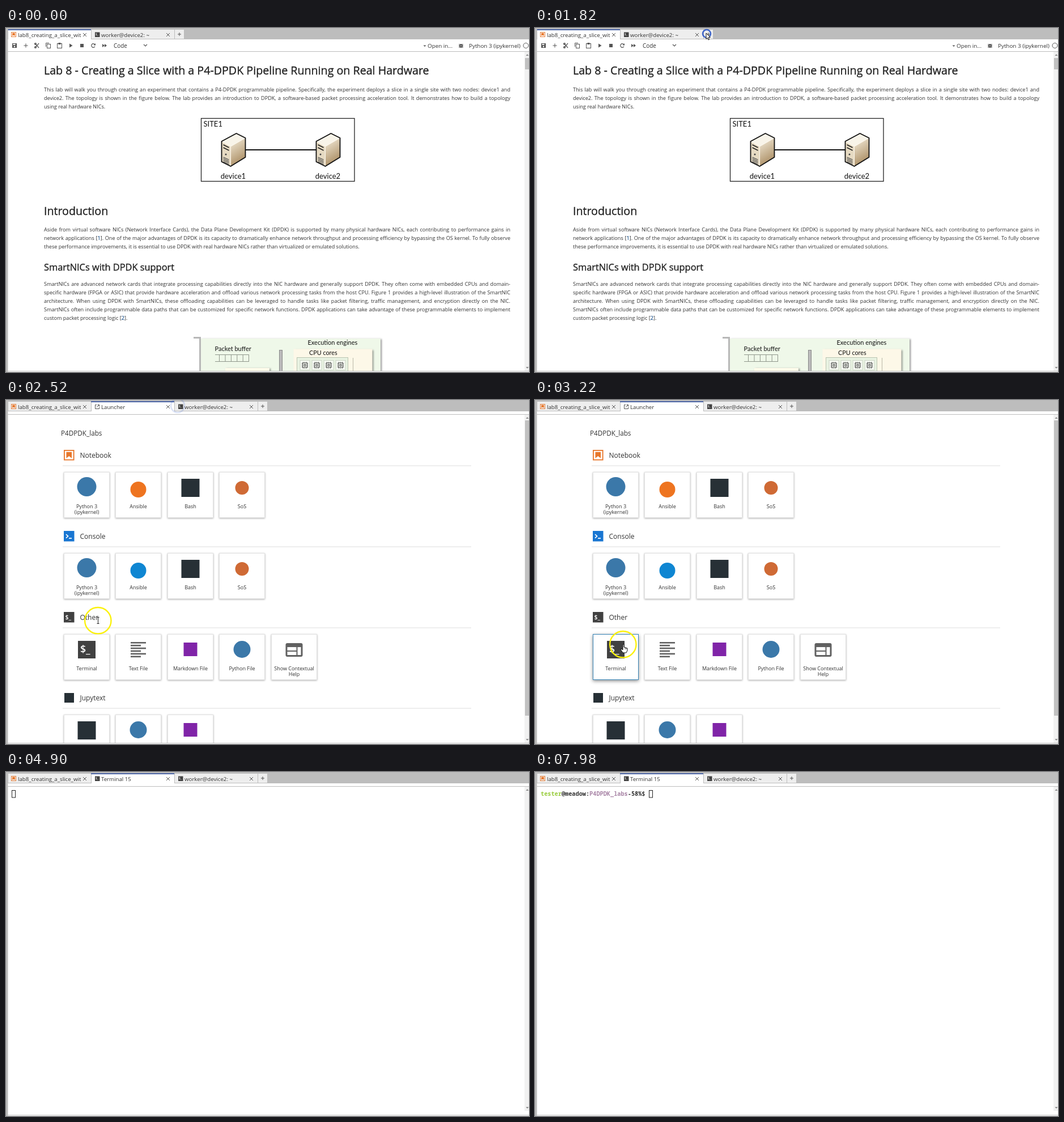
Animation of 923 by 607 pixels, one loop 8.09 s. Source, as an HTML page with a canvas:

```html
<!DOCTYPE html>
<html lang="en">
<head>
<meta charset="utf-8">
<title>Notebook walkthrough</title>
<style>
html, body { margin: 0; width: 100%; height: 100%; overflow: hidden; background: #fff; }
canvas { display: block; }
</style>
</head>
<body>
<canvas id="stage" width="923" height="607"></canvas>
<script>
const g = document.getElementById('stage').getContext('2d');
const LOOP = 8090, STEP = 140;
const SANS = '"Open Sans", "Noto Sans", sans-serif';
const FIG = 'Lato, sans-serif';
const MONO = '"Noto Sans Mono", monospace';
const INK = '#333', ICON = '#555', LINE = '#bdbdbd';
const HOST = 'worker@device2: ~';

// Spans in which the picture moves; it rests in between.
const MOVES = [[0, 0], [840, 1260], [1540, 1960], [2240, 3220], [3360, 3920], [4340, 4340]];
const PATH = [[840, 332, 120], [980, 318, 72], [1120, 309, 35], [1260, 302, 9], [2240, 302, 9],
  [2380, 215, 230], [2520, 162, 389], [2660, 160, 407], [3220, 155, 431]];
const CLICKS = [{ at: 1680, life: 1000 }, { at: 3360, life: 560 }];

const INTRO = [
  'This lab will walk you through creating an experiment that contains a P4-DPDK programmable pipeline. Specifically, the experiment deploys a slice in a single site with two nodes: device1 and',
  'device2. The topology is shown in the figure below. The lab provides an introduction to DPDK, a software-based packet processing acceleration tool. It demonstrates how to build a topology',
  'using real hardware NICs.'];
const ABOUT = [
  'Aside from virtual software NICs (Network Interface Cards), the Data Plane Development Kit (DPDK) is supported by many physical hardware NICs, each contributing to performance gains in',
  'network applications [1]. One of the major advantages of DPDK is its capacity to dramatically enhance network throughput and processing efficiency by bypassing the OS kernel. To fully observe',
  'these performance improvements, it is essential to use DPDK with real hardware NICs rather than virtualized or emulated solutions.'];
const SMART = [
  'SmartNICs are advanced network cards that integrate processing capabilities directly into the NIC hardware and generally support DPDK. They often come with embedded CPUs and domain-',
  'specific hardware (FPGA or ASIC) that provide hardware acceleration and offload various network processing tasks from the host CPU. Figure 1 provides a high-level illustration of the SmartNIC',
  'architecture. When using DPDK with SmartNICs, these offloading capabilities can be leveraged to handle tasks like packet filtering, traffic management, and encryption directly on the NIC.',
  'SmartNICs often include programmable data paths that can be customized for specific network functions. DPDK applications can take advantage of these programmable elements to implement',
  'custom packet processing logic [2].'];

function rect(x, y, w, h, color) {
  g.fillStyle = color;
  g.fillRect(x, y, w, h);
}

function frame(x, y, w, h, color, width = 1) {
  g.strokeStyle = color;
  g.lineWidth = width;
  g.strokeRect(x, y, w, h);
}

function disc(x, y, r, color) {
  g.fillStyle = color;
  g.beginPath();
  g.arc(x, y, r, 0, 7);
  g.fill();
}

function ring(x, y, r, color, width) {
  g.strokeStyle = color;
  g.lineWidth = width;
  g.beginPath();
  g.arc(x, y, r, 0, 7);
  g.stroke();
}

function trace(points) {
  g.beginPath();
  for (let i = 0; i < points.length; i += 2) g.lineTo(points[i], points[i + 1]);
}

function line(color, width, ...points) {
  trace(points);
  g.strokeStyle = color;
  g.lineWidth = width;
  g.stroke();
}

function poly(color, ...points) {
  trace(points);
  g.fillStyle = color;
  g.fill();
}

function text(str, x, y, size, { color = INK, font = SANS, weight = 400, align = 'left' } = {}) {
  g.font = `${weight} ${size}px ${font}`;
  g.textAlign = align;
  g.fillStyle = color;
  g.fillText(str, x, y);
}

// A fine outline gives the regular face a medium weight.
function heading(str, y, size) {
  text(str, 67, y, size, { color: '#222' });
  g.strokeStyle = '#222';
  g.lineWidth = 0.35;
  g.strokeText(str, 67, y);
}

function paragraph(lines, top) {
  const left = 67, right = 890;
  lines.forEach((str, i) => {
    const words = str.split(' ');
    g.font = `400 9.1px ${SANS}`;
    const widths = words.map(w => g.measureText(w).width);
    const total = widths.reduce((a, b) => a + b, 0);
    const last = i === lines.length - 1;
    const gap = last ? g.measureText(' ').width : (right - left - total) / (words.length - 1);
    let x = left;
    words.forEach((w, k) => {
      text(w, x, top + i * 15.2, 9.1);
      if (w[0] === '[') text(w[1], x + g.measureText('[').width, top + i * 15.2, 9.1, { color: '#3578c0' });
      x += widths[k] + gap;
    });
  });
}

function cross(x, y) {
  line(ICON, 1, x - 3, y - 3, x + 3, y + 3);
  line(ICON, 1, x + 3, y - 3, x - 3, y + 3);
}

function plus(x, y, r) {
  line(ICON, 1, x - r, y, x + r, y);
  line(ICON, 1, x, y - r, x, y + r);
}

function promptIcon(x, y, size) {
  rect(x, y, size, size, '#414141');
  text('$_', x + size * 0.13, y + size * 0.69, size * 0.57, { color: '#fff', weight: 600 });
}

function bookmark(x, y, s) {
  frame(x + s * 0.05, y + s * 0.05, s * 0.9, s * 0.9, '#e8772b', s * 0.1);
  poly('#e8772b', x + s * .24, y + s * .2, x + s * .76, y + s * .2, x + s * .76, y + s * .8,
    x + s * .5, y + s * .6, x + s * .24, y + s * .8);
}

function tab(i, title, kind, active) {
  const x = 3 + i * 147;
  rect(x, 3, 147, 17, active ? '#fff' : '#eee');
  frame(x + 0.5, 2.5, 147, 17, LINE);
  if (active) {
    rect(x + 1, 19, 146, 2, '#fff');
    rect(x, 2, 147, 2, '#4a63a4');
  }
  if (kind === 'book') bookmark(x + 6, 7, 9);
  if (kind === 'shell') promptIcon(x + 7, 7.5, 8.5);
  if (kind === 'launch') {
    line(ICON, 1, x + 10, 8.5, x + 7.5, 8.5, x + 7.5, 15.5, x + 14.5, 15.5, x + 14.5, 12.5);
    line(ICON, 1, x + 10, 13, x + 14.5, 8.5, x + 11.5, 8.5);
    line(ICON, 1, x + 14.5, 8.5, x + 14.5, 11.5);
  }
  g.save();
  g.beginPath();
  g.rect(x, 0, 130, 20);
  g.clip();
  text(title, x + 18, 15.5, 9.7);
  g.restore();
  cross(x + 136, 12);
}

function chrome(tabs, active) {
  rect(0, 0, 923, 607, '#fff');
  rect(0, 0, 923, 20, LINE);
  tabs.forEach(([title, kind], i) => tab(i, title, kind, i === active));
  const end = 4 + tabs.length * 147;
  rect(end, 3, 16, 16, '#eee');
  plus(end + 8, 11, 3);
  rect(0, 0, 3.5, 607, LINE);
  rect(3, 605, 920, 1, LINE);
}

function scrollbar(top, bottom, thumbTop, thumbHeight) {
  rect(915, top, 8, bottom - top, '#f1f1f1');
  if (thumbHeight) rect(916, thumbTop, 7, thumbHeight, '#c1c1c1');
  poly('#8a8a8a', 917.5, top + 7, 920, top + 4, 922.5, top + 7);
  poly('#8a8a8a', 917.5, bottom - 7, 920, bottom - 4, 922.5, bottom - 7);
}

function toolbar() {
  const y = 31;
  rect(11, y - 4, 8, 8, ICON);
  rect(12.5, y - 3, 4, 2, '#fff');
  disc(15, y + 1.8, 1.3, '#fff');
  plus(35, y, 3.6);
  line(ICON, 1.2, 51, y - 4, 58, y + 4);
  line(ICON, 1.2, 51, y + 4, 58, y - 4);
  ring(52, y - 3, 1.5, ICON, 1.2);
  ring(52, y + 3, 1.5, ICON, 1.2);
  line(ICON, 1, 70.5, y + 2, 70.5, y - 4.5, 76, y - 4.5);
  frame(72.5, y - 2.5, 6, 7, ICON);
  frame(90.5, y - 3.5, 8, 8, ICON);
  rect(92.5, y - 5, 4, 3, ICON);
  poly(ICON, 112, y - 3.5, 117.5, y, 112, y + 3.5);
  rect(131, y - 3, 6, 6, ICON);
  g.strokeStyle = ICON;
  g.lineWidth = 1.2;
  g.beginPath();
  g.arc(154, y, 3.3, 0.5, 5.6);
  g.stroke();
  poly(ICON, 158, y - 4, 158, y - 0.5, 154.5, y - 0.5);
  poly(ICON, 170, y - 3, 174, y, 170, y + 3);
  poly(ICON, 174, y - 3, 178, y, 174, y + 3);
  text('Code', 190, 34.6, 9.9);
  line(ICON, 1.2, 243, 29, 246, 32, 249, 29);
  poly(ICON, 736.5, 30.5, 741.5, 30.5, 739, 33);
  text('Open in...', 744, 34.6, 9.8);
  disc(803, 31.5, 3, ICON);
  for (const dy of [-2.5, 0, 2.5]) line(ICON, 1, 799, 31.5 + dy, 807, 31.5 + dy);
  line('#fff', 0.8, 801.8, 31.5, 804.2, 31.5);
  text('Python 3 (ipykernel)', 817, 34.6, 9.85);
  ring(917.5, 31, 4.5, ICON, 1);
  rect(3, 41, 920, 1, LINE);
}

function machine(x, label) {
  g.save();
  g.translate(x, 185);
  const side = g.createLinearGradient(18, 10, 44, 50);
  side.addColorStop(0, '#f3ebd9');
  side.addColorStop(1, '#a88a5f');
  poly('#e6dac2', 1, 15, 17, 24, 17, 59, 1, 51);
  poly('#f8f4e9', 1, 15, 27, 1, 43, 9, 17, 24);
  poly(side, 17, 24, 43, 9, 43, 43, 17, 59);
  line('#fffaf0', 1, 1, 15, 17, 24, 43, 9);
  line('#fffaf0', 1, 17, 24, 17, 58);
  for (const y of [21, 26]) line('#222', 1.6, 4, y, 14, y + 5);
  disc(8.5, 38, 1.5, '#444');
  for (let y = 43; y < 51; y += 2.6) line('#444', 1.1, 4, y, 14, y + 4.6);
  g.lineJoin = 'round';
  trace([1, 15, 27, 1, 43, 9, 43, 43, 17, 59, 1, 51]);
  g.closePath();
  g.strokeStyle = '#111';
  g.lineWidth = 1.8;
  g.stroke();
  g.restore();
  text(label, x + 21.5, 266, 13, { font: FIG, color: '#111', align: 'center' });
}

function topology() {
  frame(344.5, 159.5, 270.5, 111, '#222', 1.3);
  text('SITE1', 348.5, 174, 13, { font: FIG, color: '#111' });
  line('#111', 1.8, 422, 215, 548, 215);
  machine(379.5, 'device1');
  machine(546.5, 'device2');
}

function panel(x, y, w, color) {
  g.save();
  g.shadowColor = 'rgba(0,0,0,.4)';
  g.shadowBlur = 3;
  g.shadowOffsetX = 2;
  g.shadowOffsetY = 1;
  rect(x, y, w, 80, color);
  g.restore();
}

function chip(x, y) {
  rect(x - 8.5, y - 8.5, 17, 17, '#f6faf2');
  frame(x - 8.5, y - 8.5, 17, 17, '#c4ccbd', 0.8);
  for (const d of [-3, 0, 3]) {
    line('#666', 0.8, x + d, y - 6, x + d, y + 6);
    line('#666', 0.8, x - 6, y + d, x + 6, y + d);
  }
  rect(x - 4, y - 4, 8, 8, '#f6faf2');
  frame(x - 4, y - 4, 8, 8, '#444');
  frame(x - 1.5, y - 1.5, 3, 3, '#444');
}

function cardFigure() {
  const label = { font: FIG, color: '#111' };
  g.save();
  g.beginPath();
  g.rect(320, 540, 360, 65);
  g.clip();
  panel(344, 548, 317, '#eff8e9');
  rect(331, 545, 13, 3, '#b8b8b8');
  rect(341, 545, 3, 62, '#b8b8b8');
  text('Packet buffer', 368.5, 570, 11, label);
  frame(376.5, 576.5, 52, 12, '#8f968b');
  line('#8f968b', 1, 369, 576.5, 376, 576.5);
  line('#8f968b', 1, 369, 588.5, 376, 588.5);
  for (let x = 387; x < 425; x += 10.4) line('#8f968b', 1, x, 576, x, 589);
  panel(387, 600, 78, '#fffbea');
  rect(482, 568, 6, 40, '#bcbcbc');
  frame(482.5, 568.5, 5, 40, '#888');
  text('Execution engines', 532.5, 559, 11, label);
  panel(507.5, 566.5, 139, '#fdf8e8');
  text('CPU cores', 535, 577, 10.8, label);
  rect(513, 582, 91, 30, '#e9f3e2');
  frame(513.5, 581.5, 90, 30, '#b9c4b1');
  line('#b9b9a9', 1, 612.5, 582, 612.5, 606);
  for (let i = 0; i < 4; i++) chip(527.5 + i * 21, 595);
  g.restore();
}

function notebook(t) {
  chrome([['lab8_creating_a_slice_with', 'book'], [HOST, 'shell']], 0);
  toolbar();
  scrollbar(42, 605, 53, 20);
  if (t >= 840 && t < 1260) poly('#b5b5b5', 50, 70, 54.5, 74, 50, 78);
  heading('Lab 8 - Creating a Slice with a P4-DPDK Pipeline Running on Real Hardware', 82, 19.65);
  paragraph(INTRO, 111.5);
  topology();
  heading('Introduction', 329.5, 19.65);
  paragraph(ABOUT, 358.5);
  heading('SmartNICs with DPDK support', 428.3, 16.35);
  paragraph(SMART, 454.5);
  cardFigure();
}

const square = (x, y, s, color) => rect(x - s / 2, y - s / 2, s, s, color);
const ICONS = {
  python: (x, y) => disc(x, y + 26, 17, '#3b78a9'),
  ansible: (x, y) => disc(x, y + 31, 14, '#ee7420'),
  ansibleBlue: (x, y) => disc(x, y + 31, 14, '#0f86d2'),
  bash: (x, y) => square(x, y + 28, 32, '#273036'),
  sos: (x, y) => disc(x, y + 28, 12, '#cf6a35'),
  terminal: (x, y) => promptIcon(x - 15.5, y + 12, 31),
  textFile(x, y) {
    for (let i = 0; i < 6; i++) rect(x - 13.5, y + 14 + i * 4.9, i % 2 ? 18 : 27, 2.6, '#616161');
  },
  markdown: (x, y) => square(x, y + 27, 24, '#8024a8'),
  pyFile: (x, y) => disc(x, y + 27, 15, '#3b78a9'),
  help(x, y) {
    g.fillStyle = '#616161';
    g.beginPath();
    g.roundRect(x - 15, y + 16, 30, 24, 3);
    g.fill();
    rect(x - 12, y + 23, 16, 6, '#fff');
    rect(x - 12, y + 31, 16, 6, '#fff');
    rect(x + 6, y + 23, 6, 14, '#fff');
  }
};
const KERNEL = 'Python 3|(ipykernel)';
const SECTIONS = [
  ['Notebook', [['python', KERNEL], ['ansible', 'Ansible'], ['bash', 'Bash'], ['sos', 'SoS']]],
  ['Console', [['python', KERNEL], ['ansibleBlue', 'Ansible'], ['bash', 'Bash'], ['sos', 'SoS']]],
  ['Other', [['terminal', 'Terminal'], ['textFile', 'Text File'], ['markdown', 'Markdown File'],
    ['pyFile', 'Python File'], ['help', 'Show Contextual|Help']]],
  ['Jupytext', [['bash', ''], ['pyFile', ''], ['markdown', '']]]
];

function sectionIcon(i, x, y) {
  if (i === 0) bookmark(x, y, 18.5);
  if (i === 1) {
    rect(x, y, 18.5, 18.5, '#1976d2');
    line('#fff', 1.7, x + 4, y + 6, x + 7.5, y + 9.3, x + 4, y + 12.6);
    line('#fff', 1.7, x + 9, y + 13, x + 14, y + 13);
  }
  if (i === 2) promptIcon(x, y, 18.5);
  if (i === 3) square(x + 9.5, y + 9.5, 17, '#273036');
}

function card(x, y, [icon, label], hover) {
  g.save();
  g.shadowColor = hover ? 'rgba(0,0,0,.45)' : 'rgba(0,0,0,.32)';
  g.shadowBlur = hover ? 6 : 3;
  g.shadowOffsetY = hover ? 2 : 1;
  rect(x, y, 81, 81, '#fff');
  g.restore();
  frame(x + 0.5, y + 0.5, 80, 80, hover ? '#3683b5' : '#e2e2e2');
  const mid = x + 40.5;
  ICONS[icon](mid, y);
  label.split('|').forEach((part, k) => text(part, mid, y + 64 + k * 10.3, 9, { align: 'center' }));
}

function launcher(hover) {
  chrome([['lab8_creating_a_slice_with', 'book'], ['Launcher', 'launch'], [HOST, 'shell']], 1);
  rect(3, 25, 920, 1, LINE);
  scrollbar(26, 605, 36, 521);
  text('P4DPDK_labs', 97, 63, 11.7);
  g.save();
  g.beginPath();
  g.rect(3, 26, 912, 579);
  g.clip();
  SECTIONS.forEach(([title, cards], i) => {
    const y = Math.round(i * 142.8);
    sectionIcon(i, 102, y + 88);
    text(title, 130.5, y + 102, 12);
    rect(100, y + 115.5, 721, 1, '#dedede');
    cards.forEach((c, k) => card(102 + Math.round(k * 91.4), y + 127, c, hover && i === 2 && k === 0));
  });
  g.restore();
}

function terminal(t) {
  chrome([['lab8_creating_a_slice_with', 'book'], ['Terminal 15', 'shell'], [HOST, 'shell']], 1);
  rect(3, 25, 920, 1, LINE);
  if (t >= 4900) scrollbar(26, 598);
  let x = 10;
  if (t >= 7140) {
    for (const [str, color] of [['tester', '#98cc3c'], ['@meadow:', '#333'], ['P4DPDK_labs', '#a884a6'], ['-58%$ ', '#333']]) {
      text(str, x, 42.3, 10.25, { color, font: MONO, weight: 700 });
      x += g.measureText(str).width;
    }
  }
  const lit = [[4900, 5040], [5600, 6160], [6720, 7700], [7980, LOOP]].some(([a, b]) => t >= a && t < b);
  if (lit) frame(Math.round(x) + 0.5, 32.5, 6, 12.5, '#222');
}

function pointerAt(t) {
  const i = PATH.findIndex(p => p[0] > t);
  if (i < 0) return PATH[PATH.length - 1].slice(1);
  const [t0, x0, y0] = PATH[i - 1], [t1, x1, y1] = PATH[i];
  const k = (t - t0) / (t1 - t0);
  return [x0 + (x1 - x0) * k, y0 + (y1 - y0) * k];
}

function shape(x, y, points) {
  g.save();
  g.translate(x, y);
  g.lineJoin = 'round';
  trace(points);
  g.closePath();
  g.fillStyle = '#fff';
  g.fill();
  g.strokeStyle = '#111';
  g.lineWidth = 1;
  g.stroke();
  g.restore();
}

function pointer(x, y) {
  if (y > 413) {
    shape(x, y, [0, 0, 2, 0, 2, 5, 8, 7, 8, 11, 6, 15, 0, 15, -4, 9, -3, 8, 0, 10]);
    line('#111', 0.7, x + 4, y + 6, x + 4, y + 9);
    line('#111', 0.7, x + 6, y + 7, x + 6, y + 9);
  } else if (x < 170 && Math.abs(y - 389) < 12) {
    line('#222', 1, x + 0.5, y - 5, x + 0.5, y + 5);
    for (const d of [-5.5, 5.5]) line('#222', 1, x - 1.5, y + d, x + 2.5, y + d);
  } else {
    shape(x, y, [0, 0, 0, 10.5, 2.4, 8.3, 4, 12, 5.7, 11.2, 4.2, 7.6, 7.3, 7.4]);
  }
}

function hold(t) {
  const [, end] = MOVES.filter(m => m[0] <= t).pop();
  return Math.min(Math.floor(t / STEP) * STEP, end);
}

function draw(now) {
  const t = now % LOOP, s = hold(t);
  const shown = s >= 840 && s < 4340;
  const [x, y] = shown ? pointerAt(s) : [0, 0];
  if (t < 2240) notebook(s);
  else if (t < 4340) launcher(y > 413);
  else terminal(t);
  if (!shown) return;
  for (const { at, life } of CLICKS) {
    const age = s - at;
    if (age < 0 || age >= life) continue;
    const [cx, cy] = pointerAt(at);
    g.globalAlpha = 1 - age / life;
    ring(cx + 1, cy + 1, 6 + age / STEP, '#2450c4', 2.6);
    g.globalAlpha = 1;
  }
  if (s < 1540 || (s >= 2240 && s < 3360)) ring(x + 0.3, y + 0.2, 23.2, '#fbf10a', 2.4);
  pointer(x, y);
}

function loop() {
  draw(performance.now());
  requestAnimationFrame(loop);
}
loop();
</script>
</body>
</html>
```
